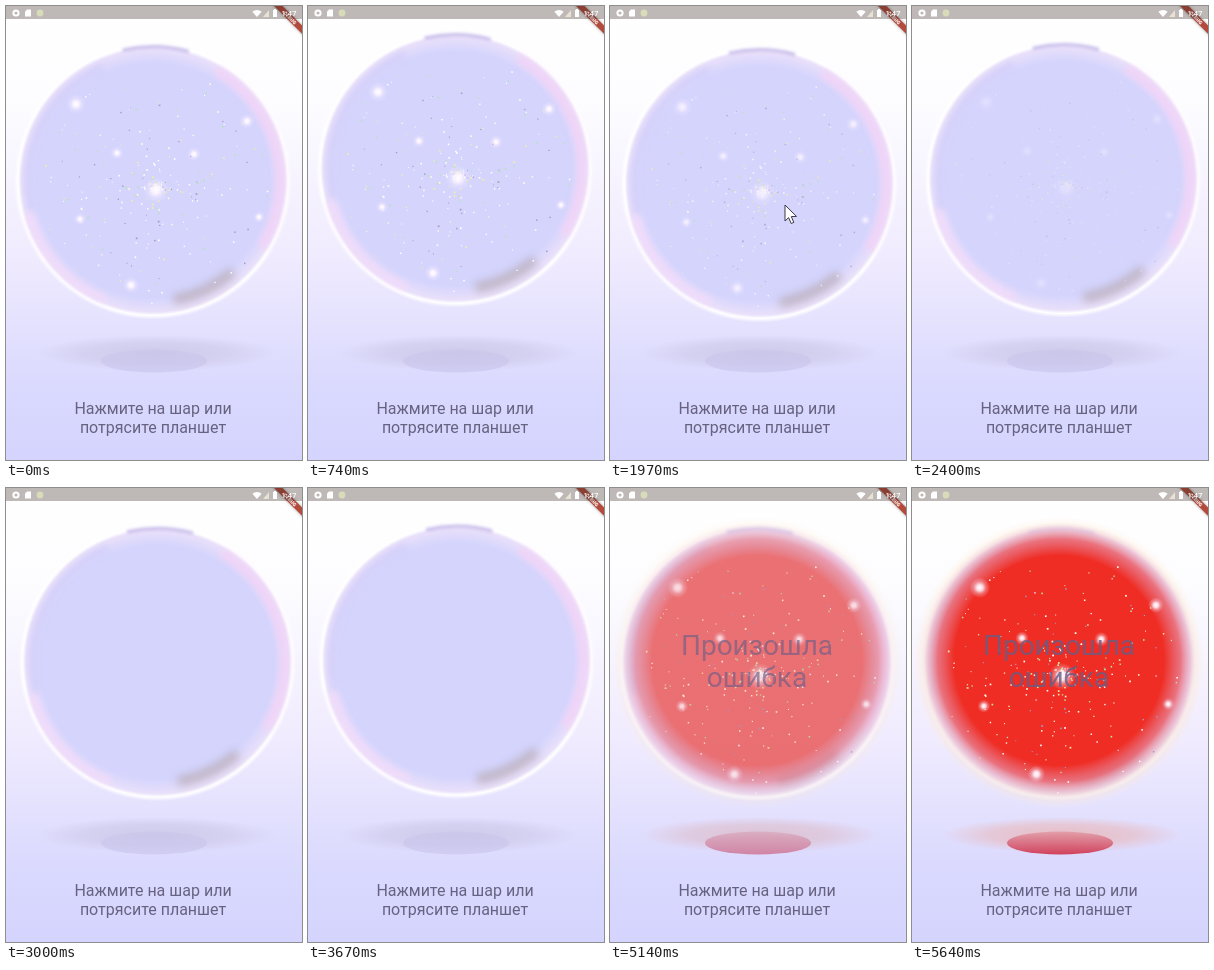
Recreate the animation shown at these times as an HTML page with a canvas. Size 296 by 454 pixels, loop 5680 ms.

```html
<!DOCTYPE html>
<html lang="ru">
<head>
<meta charset="utf-8">
<style>
  html, body { margin: 0; height: 100%; overflow: hidden; background: #fff; }
  canvas { display: block; width: 296px; height: 454px; }
</style>
</head>
<body>
<canvas id="stage" width="296" height="454"></canvas>
<script>
const ctx = document.getElementById('stage').getContext('2d');
const LOOP = 5680, TAU = Math.PI * 2, CX = 147, CY = 174.5;
const LAVENDER = [212, 212, 253], RED = [239, 45, 36];

const ramp = (t, from, to) => Math.min(1, Math.max(0, (t - from) / (to - from)));
const mix = (a, b, k) => a.map((v, i) => v + (b[i] - v) * k);
const rgba = (c, alpha) => `rgba(${c},${alpha})`;

function random(seed) {
  return () => (seed = (seed * 16807) % 2147483647) / 2147483647;
}
const rnd = random(77);
const dotColors = ['#fff', '#fff', '#fffbe0', '#f4f0a0', '#b4e8a4', '#a29ac4'];
const dots = Array.from({ length: 250 }, (_, i) => {
  const r = 118 * rnd() ** 1.5, a = rnd() * TAU;
  return { x: 150 + r * Math.cos(a), y: 180 + r * Math.sin(a), size: 0.9 + rnd() * 0.8, color: dotColors[i % 6] };
});
// Bright stars, largest first.
const flares = [[150, 184], [70, 98], [125, 279], [241, 115], [188, 148], [111, 147], [74, 213], [253, 211]];

function fade(gradient, colors) {
  colors.forEach(([p, c]) => gradient.addColorStop(p, c));
  return gradient;
}

function disc(x, y, r, colors) {
  ctx.fillStyle = fade(ctx.createRadialGradient(x, y, 0, x, y, r), colors);
  ctx.beginPath();
  ctx.arc(x, y, r, 0, TAU);
  ctx.fill();
}

function softArc(r, from, to, width, color, blur) {
  ctx.filter = `blur(${blur}px)`;
  ctx.strokeStyle = color;
  ctx.lineWidth = width;
  ctx.beginPath();
  ctx.arc(CX, CY, r, from, to);
  ctx.stroke();
  ctx.filter = 'none';
}

function polygon(color, ...points) {
  ctx.fillStyle = color;
  ctx.beginPath();
  points.forEach(([x, y]) => ctx.lineTo(x, y));
  ctx.closePath();
  ctx.fill();
}

function label(text, x, y, size, color, weight = 400) {
  ctx.font = `${weight} ${size}px Roboto, sans-serif`;
  ctx.textAlign = 'center';
  ctx.fillStyle = color;
  ctx.fillText(text, x, y);
}

function drawBackground() {
  ctx.fillStyle = fade(ctx.createLinearGradient(0, 0, 0, 454),
    [[0, '#fff'], [0.2, '#fdfdff'], [0.55, '#f0ebfe'], [0.84, '#dad9fe'], [1, '#d4d4fe']]);
  ctx.fillRect(0, 0, 296, 454);
}

function drawRibbon() {
  ctx.save();
  ctx.translate(296, 0);
  ctx.rotate(Math.PI / 4);
  ctx.shadowColor = 'rgba(0,0,0,.4)';
  ctx.shadowBlur = 3;
  ctx.fillStyle = '#b34a3c';
  ctx.fillRect(-30, 13.8, 60, 5.9);
  ctx.shadowBlur = 0;
  label('DEBUG', 0, 18.6, 5, '#fff', 900);
  ctx.restore();
}

function drawStatusBar() {
  ctx.fillStyle = 'rgba(60,40,36,.33)';
  ctx.fillRect(0, 0, 296, 13);
  ctx.strokeStyle = '#fff';
  ctx.lineWidth = 2;
  ctx.beginPath();
  ctx.arc(10, 7, 2.6, 0, TAU);
  ctx.stroke();
  polygon('#fff', [19, 5.5], [21, 3.5], [25, 3.5], [25, 10.5], [19, 10.5]);
  disc(34, 7, 3.4, [[0, '#d9dcb8'], [1, '#d9dcb8']]);
  ctx.fillStyle = '#fff';
  ctx.beginPath();
  ctx.moveTo(251, 11);
  ctx.arc(251, 11, 7, -2.3, -0.84);
  ctx.fill();
  polygon('#e8e2d2', [257, 11], [263, 11], [263, 4]);
  ctx.fillStyle = '#fff';
  ctx.fillRect(267, 4, 4, 7);
  ctx.fillRect(268, 3, 2, 1);
  label('1:47', 283, 10, 7.5, '#fff', 500);
}

function drawShadow(heat) {
  const outer = mix([204, 200, 232], [232, 186, 190], heat);
  const inner = mix([194, 188, 230], [208, 44, 66], heat);
  ctx.save();
  ctx.translate(150, 347);
  ctx.scale(1, 0.15);
  disc(0, 0, 120, [[0, rgba(outer, 0.9)], [0.6, rgba(outer, 0.6)], [1, rgba(outer, 0)]]);
  ctx.restore();
  ctx.fillStyle = fade(ctx.createLinearGradient(0, 343, 0, 367), [[0, rgba(inner, 0.2)], [1, rgba(inner, 0.5 + 0.4 * heat)]]);
  ctx.beginPath();
  ctx.ellipse(148, 355, 53, 11.5, 0, 0, TAU);
  ctx.fill();
}

function drawBall(heat) {
  disc(CX, CY, 146, [[0.88, rgba([250, 218, 190], heat * 0.8)], [1, 'rgba(255,240,220,0)']]);
  ctx.globalAlpha = 1 - heat * 0.6;
  disc(CX, CY, 139, [[0, rgba(LAVENDER, 1)], [0.84, rgba(LAVENDER, 1)], [0.945, '#e9e0fa'],
    [0.97, '#fff'], [1, 'rgba(255,255,255,0)']]);
  softArc(127, -1.05, 0.55, 9, 'rgba(246,208,246,.75)', 3);
  softArc(128, 1.95, 2.9, 7, 'rgba(246,218,250,.8)', 3);
  softArc(125, 2.9, 4.3, 6, 'rgba(202,200,250,.7)', 3);
  softArc(134, -1.8, -1.3, 3, 'rgba(176,160,226,.7)', 1.5);
  softArc(121, 0.85, 1.4, 10, 'rgba(178,164,168,.65)', 4);
  ctx.globalAlpha = 1;
  disc(CX, CY - 2, 138, [[0, rgba(RED, heat)], [0.76, rgba(RED, heat)], [0.88, rgba([232, 70, 86], heat * 0.7)],
    [0.95, rgba([224, 150, 190], heat * 0.4)], [1, rgba([240, 200, 210], 0)]]);
}

function drawStars(t, heat) {
  ctx.save();
  ctx.globalAlpha = Math.max(1 - ramp(t, 1700, 2700), Math.sqrt(heat));
  // The stars return slightly larger and lower.
  if (heat) {
    ctx.translate(145, 177);
    ctx.scale(1.03, 1.03);
    ctx.translate(-145, -173);
  }
  for (const d of dots) {
    ctx.fillStyle = d.color;
    ctx.fillRect(d.x, d.y, d.size, d.size);
  }
  flares.forEach(([x, y], i) => disc(x, y, 4 + 9 / (1 + i / 2),
    [[0, '#fff'], [0.3, 'rgba(255,246,255,.85)'], [0.6, 'rgba(246,236,255,.35)'], [1, 'rgba(246,236,255,0)']]));
  ctx.restore();
}

function drawCursor() {
  ctx.beginPath();
  [[0, 0], [0, 16], [3.6, 12.6], [6.2, 18.5], [8.8, 17.4], [6.3, 11.6], [11.5, 11.4]]
    .forEach(([x, y]) => ctx.lineTo(175 + x, 199 + y));
  ctx.closePath();
  ctx.fillStyle = '#fff';
  ctx.strokeStyle = '#3c3a44';
  ctx.lineWidth = 1;
  ctx.fill();
  ctx.stroke();
}

// The ball bobs once a second; the shake stretches two of the cycles.
function bobOffset(t) {
  const cycle = (t - 1500) / 1000 - 0.63 * ramp(t, 2370, 3640) * 0.43 + 0.13 * ramp(t, 1500, 2370);
  return -12 * Math.sin((t < 3640 ? cycle : (t - 3640) / 1000) * TAU);
}

function frame(now) {
  const t = now % LOOP;
  const heat = ramp(t, 4340, 5640);
  const sway = 4.7 * Math.sin(Math.PI * ramp(t, 1600, 3900));

  drawBackground();
  drawShadow(heat);
  ctx.save();
  ctx.translate(sway, bobOffset(t));
  drawBall(heat);
  drawStars(t, heat);
  ctx.restore();

  const ink = rgba([104, 92, 134], 0.8 * Math.sqrt(heat));
  label('Произошла', 147, 167, 28, ink);
  label('ошибка', 147, 199, 28, ink);
  label('Нажмите на шар или', 147, 408, 16, '#66627f');
  label('потрясите планшет', 147, 427, 16, '#66627f');
  drawRibbon();
  drawStatusBar();
  if (t > 1000 && t < 2000) drawCursor();
  requestAnimationFrame(frame);
}
requestAnimationFrame(frame);
</script>
</body>
</html>
```
